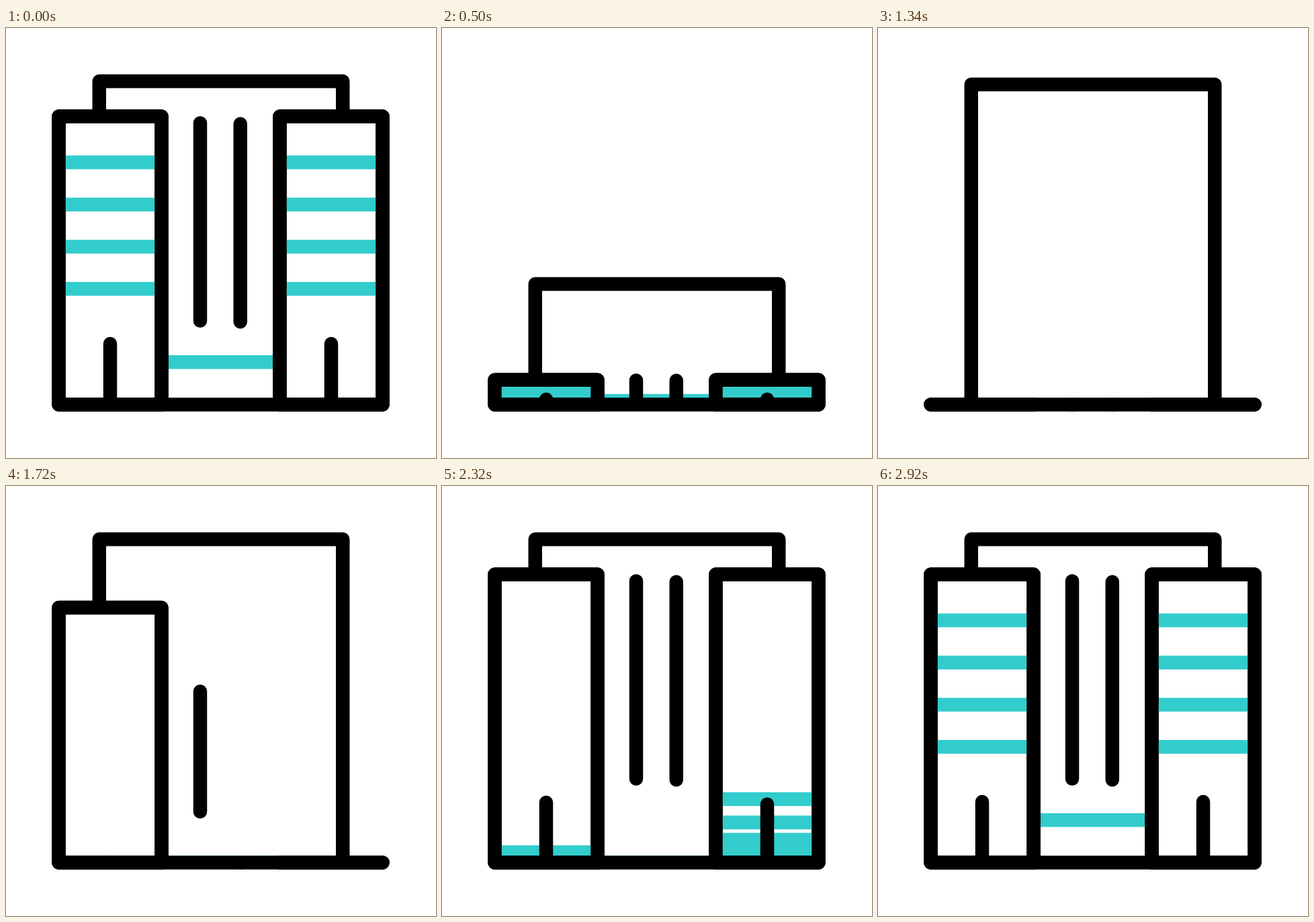
An HTML page for the animation above (3.6 s loop, 640 by 640 pixels).

```html
<!DOCTYPE html>
<html lang="en">
<head>
<meta charset="utf-8">
<title>Building</title>
<style>
  html, body { margin: 0; width: 100%; height: 100%; overflow: hidden; background: #fff; }
  svg { display: block; width: 100%; height: 100%; }
  .line { fill: none; stroke: #000; stroke-width: 20.5; stroke-linecap: round; stroke-linejoin: round; }
  .wall { fill: #fff; }
  .band { fill: none; stroke: #33cccc; stroke-width: 20.5; }
</style>
</head>
<body>
<svg id="stage" viewBox="0 0 640 640">
  <clipPath id="ground"><rect width="640" height="560"/></clipPath>
</svg>
<script>
const LOOP = 3600, FOLD = 660, BASE = 560.5;
const stage = document.getElementById('stage');
const parts = [];

// Cubic bezier (.333, 0, .5, 1), solved by bisection.
function ease(x) {
  if (x <= 0) return 0;
  if (x >= 1) return 1;
  let lo = 0, hi = 1, u = 0.5;
  for (let i = 0; i < 24; i++) {
    u = (lo + hi) / 2;
    const v = 1 - u;
    if (u * v * v + 1.5 * u * u * v + u * u * u < x) lo = u; else hi = u;
  }
  return u * u * (3 - 2 * u);
}

// Adds a part whose heights above the base are scaled over time.
function add(cls, start, span, shape, low = 0) {
  const path = document.createElementNS('http://www.w3.org/2000/svg', 'path');
  path.setAttribute('class', cls);
  if (cls === 'band') path.setAttribute('clip-path', 'url(#ground)');
  stage.appendChild(path);
  parts.push({ path, start, span, shape, low });
}

const frame = (l, r, top) => y => `M${l} ${BASE}V${y(top)}H${r}V${BASE}`;
const post = (x, top, bottom) => y => `M${x} ${y(bottom)}V${y(top)}`;
const band = (l, r, mid) => y => `M${l} ${y(mid)}H${r}`;

function tower(l, start, doorStart, bandStart) {
  const r = l + 153;
  const box = frame(l, r, 131.5);
  add('line wall', start, 400, y => box(y) + 'Z');
  for (let i = 0; i < 4; i++) {
    add('band', bandStart + i * 20, 500, band(l, r, 200 + i * 62.75));
  }
  add('line', start, 400, y => box(y) + 'Z');
  add('line', doorStart, 400, post(l + 76.5, 470, BASE));
}

add('line', 1000, 380, frame(138.75, 501.25, 79.25), 0.314);
add('band', 2420, 500, band(231.5, 407.5, 497.25));
add('line', 1520, 400, post(289, 141.5, 435.75));
add('line', 1800, 400, post(348.75, 142.75, 437.25));
tower(78.5, 1432, 1956, 2262);
tower(407.5, 1720, 1990, 2172);
add('line', 0, 1, () => `M78.5 ${BASE}H560.5`);

function draw(t) {
  const fold = 1 - ease(t / FOLD);
  for (const p of parts) {
    const rise = t < FOLD ? fold : ease((t - p.start) / p.span);
    const scale = p.low + (1 - p.low) * rise;
    p.path.setAttribute('d', p.shape(v => (BASE - (BASE - v) * scale).toFixed(2)));
  }
}

const begin = performance.now();
function tick() {
  const t = (performance.now() - begin) % LOOP;
  draw(t);
  requestAnimationFrame(tick);
}
draw(0);
requestAnimationFrame(tick);
</script>
</body>
</html>
```
